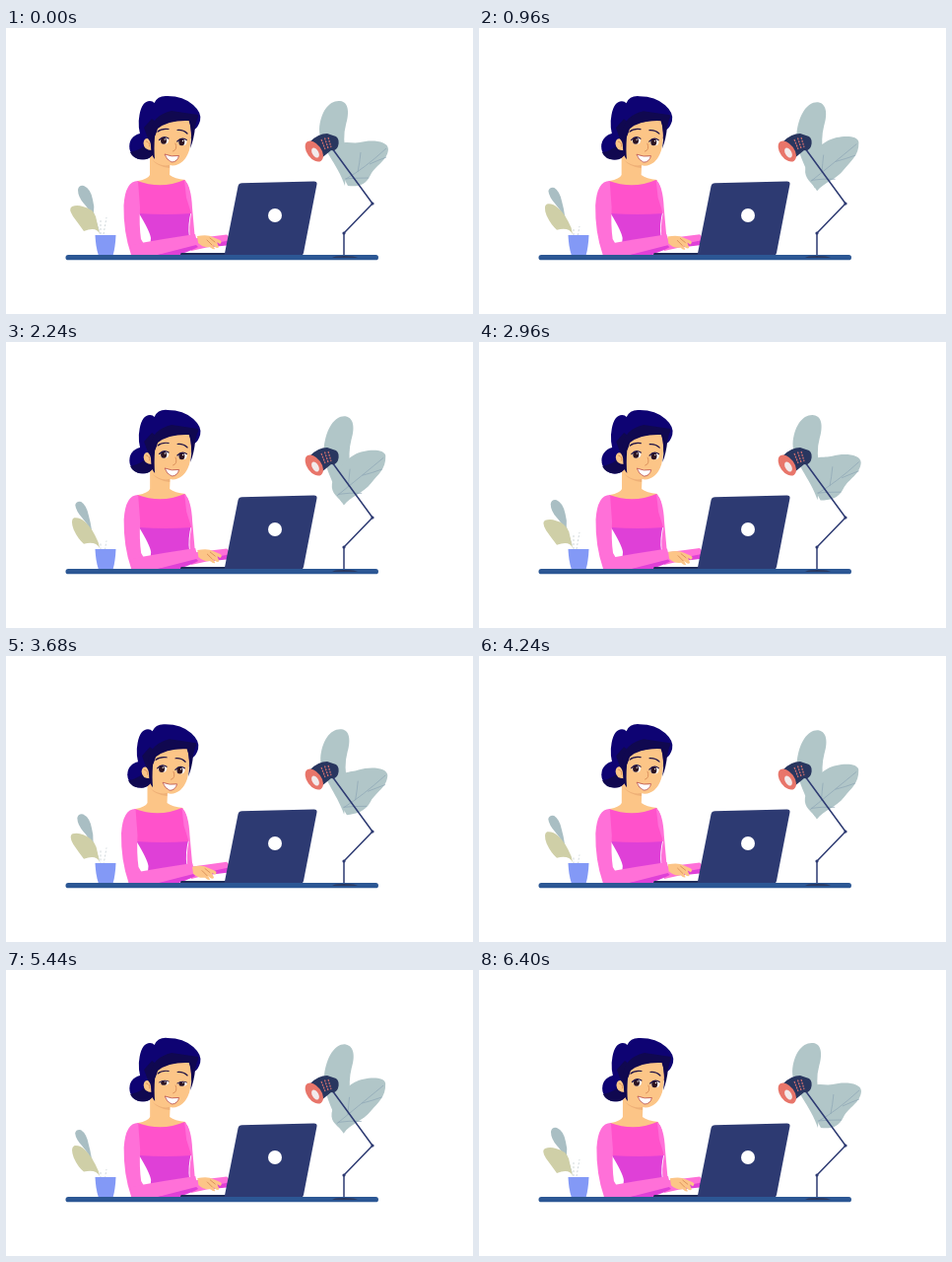
An HTML page that plays this animation: 474x290 px, repeating every 6480 ms.

```html
<!DOCTYPE html>
<html lang="en">
<head>
<meta charset="utf-8">
<title>Working at a desk</title>
<style>
  html, body { margin: 0; width: 100%; height: 100%; overflow: hidden; background: #fff; }
  svg { display: block; width: 474px; height: 290px; }
  .skin { fill: #fcc587; }
  .hair { fill: #0e0373; }
  .shade { fill: #100850; }
  .pink { fill: #ff52cb; }
  .sleeve { fill: #ff70d8; }
  .magenta { fill: #df40d7; }
  .navy { fill: #2d3a72; }
  .line { fill: none; stroke: #2d3a72; stroke-width: 1.5; stroke-linecap: round; stroke-linejoin: round; }
  .vein { fill: none; stroke: #8da5b5; stroke-width: .7; }
  .brow { fill: none; stroke: #1b1045; stroke-width: 1.2; stroke-linecap: round; }
  .crease { fill: none; stroke: #d88d59; stroke-width: .9; stroke-linecap: round; }
</style>
</head>
<body>
<svg viewBox="0 0 474 290">
  <g fill="#b1c6c8">
    <path id="tallLeaf"/>
    <path id="wideLeaf"/>
    <path id="veins" class="vein"/>
  </g>

  <g id="lamp">
    <path class="line" d="M331 122L372 178L343 208V231"/>
    <circle class="navy" cx="372" cy="178" r="1.6"/>
    <circle class="navy" cx="343" cy="208" r="1.6"/>
    <path fill="#29365f" d="M309 115Q317 107 326 107L335 110Q339 113 337 120Q335 125 330 124L319 133Z"/>
    <path d="M320 113l4 10M323.500 111.500l3.500 10.500M327 111l3 10" fill="none" stroke="#d87370" stroke-width="1.200" stroke-dasharray="2 1"/>
    <ellipse cx="312.800" cy="125" rx="12" ry="7.200" fill="#e8756a" transform="rotate(54 312.800 125)"/>
    <ellipse id="bulb" cx="314" cy="126.500" rx="5.500" ry="3.200" fill="#f2eaeb" transform="rotate(60 314 126.500)"/>
  </g>

  <path id="blueLeaf" fill="#a9bec3"/>
  <path id="oliveLeaf" fill="#cfcfa7"/>
  <path id="stems" d="M96 209L96 195M99 209L102 192" fill="none" stroke="#c5ced2" stroke-width=".8" stroke-dasharray="2 2"/>
  <path fill="#8399f6" d="M90.500 210H111.500Q111 222 108.500 231H94Q91 222 90.500 210Z"/>

  <g id="farArm">
    <path class="sleeve" d="M186 214L224 209Q229 213 225 219L205 222L188 226Z"/>
    <path class="magenta" d="M206 219L226 215L224 220L207 222Z"/>
  </g>
  <g id="body">
    <path class="skin" d="M146 126H167L166 149Q171 153 182 154L184 164H132L134 155Q144 153 146 149Z"/>
    <path fill="#eeb077" d="M148 133Q156 141 166 139L166 142Q154 141 148 133Z"/>
    <path class="magenta" d="M135 185H188Q184 200 186 212L178 230H140Q147 224 147 213Q146 206 135 188Z"/>
    <path class="pink" d="M133 155Q158 164 181 154Q187 160 187 174L188 188Q162 190 135 188Z"/>
    <path class="sleeve" d="M181 154Q188 160 189 182L191.500 210L187 214Q185 203 188 188L183 172Z"/>
    <path class="sleeve" d="M134 155Q121 155 119.500 180Q119 207 127 230H140Q144 224 137 214Q135 200 136 182Z"/>
  </g>
  <g id="nearArm">
    <path class="sleeve" d="M126 220Q142 217 160 214L192 209L195 221L172 227L148 231H128Z"/>
    <path class="magenta" d="M150 231L193 220L195 222Q186 227 171 231Z"/>
  </g>
  <g id="hand">
    <path class="skin" d="M193 211Q204 209 209 212L216 215Q219 217 216 219L213 217L215 222Q214 224 211 222L209 220L211 224Q209 225 206 222Q199 223 194 218Z"/>
    <path class="crease" d="M206 213l5 4M203 215l5 5"/>
  </g>

  <g id="head">
    <circle class="hair" cx="138.500" cy="120" r="13.300"/>
    <path class="shade" d="M126 126Q138 124 149 112L151 126Q146 134 138 133.300Q129 133 126 126Z"/>
    <path class="hair" d="M138 114Q133 100 135.500 88Q138 74 146 74Q149 74 150.500 76Q154 68 164 69Q180 69 190 78Q199 86 197 94Q195 101 191 103L188 112L172 112L146 122Z"/>
    <path class="skin" d="M150 100Q165 94 186 93Q190 109 186 124Q181 139 169 139.500Q153 137 148 124Q140 124 139.500 117Q140 110 147 113Z"/>
    <path class="crease" d="M142.500 115q4 1 3 5"/>
    <path class="shade" d="M148 92Q157 97 151 110Q150 123 151 133Q147 129 147 120Q147 115 144 112L140 101Z"/>
    <path class="shade" d="M146 106Q149 88 168 84L195 88Q196 95 186 94Q165 93 154 102L150 112Z"/>
    <path class="shade" d="M185 92Q190 105 187 122Q191 112 192 100L194 92Z"/>
    <path class="brow" d="M154 105Q158 101.500 165 102.500M174 103.500Q180 103 184 107"/>
    <g id="eyes">
      <g id="eye">
        <ellipse cx="160.800" cy="114" rx="4.300" ry="3.600" fill="#fff"/>
        <ellipse cx="160" cy="114.200" rx="3" ry="3.500" fill="#2d1422"/>
        <circle cx="161.200" cy="113" r=".7" fill="#fff"/>
        <path class="brow" d="M155.500 113.500Q160 108.500 165 112"/>
      </g>
      <use href="#eye" x="18.300" y="1.500"/>
    </g>
    <path class="crease" d="M172 117Q174.500 123.500 169.500 125"/>
    <path d="M161 128Q168 131 175.500 129.500Q174 136 168 136Q163 134 161 128Z" fill="#fff" stroke="#b94f4c" stroke-width=".8"/>
  </g>

  <path fill="#1f2c58" d="M178 228H224V231H178Q176 229.500 178 228Z"/>
  <path class="navy" d="M239.500 157.300L312.500 155.500Q316 155.500 315.500 158.500L302 228Q301.500 231 298 231H221.500L235.500 160.500Q236.300 157.300 239.500 157.300Z"/>
  <circle cx="273" cy="190" r="7" fill="#fff"/>
  <rect x="60.500" y="230" width="317.500" height="5.300" rx="2.650" fill="#2c5794"/>
  <path fill="#28375f" d="M331 233Q333 231 343 231Q354 231 357 233Z"/>
</svg>
<script>
  const LOOP = 6480, STEP = 80, SWAY = LOOP / 2, TAP = LOOP / 6;
  const el = id => document.getElementById(id);
  const wave = (t, peak, period) => Math.cos(2 * Math.PI * (t - peak) / period);
  const move = (id, value) => el(id).setAttribute('transform', value);

  // Each pair holds the open and the closed pose of a leaf.
  const leaves = {
    tallLeaf: ['M344 160C337 138 318 120 318 103C319 85 328 73 339 74C349 75 348 88 345 98Q341 112 346 130Z',
               'M339 164C331 146 322 126 325 108C328 88 337 75 347 76C357 78 356 91 353 100Q350 112 351 130Z'],
    wideLeaf: ['M347 160C341 149 335 134 337 122C341 112 350 118 359 116C370 113 388 114 388 123C387 135 375 139 370 149C365 160 357 161 347 160Z',
               'M341 168C336 160 327 164 328 154C330 138 342 120 352 113C360 107 383 104 384 112C385 126 379 132 371 140C361 151 346 154 341 168Z'],
    veins: ['M345 153Q363 143 386 122M357 146Q359 137 360 126M369 138Q378 134 386 131M344 153Q354 152 368 152',
            'M332 157Q353 138 382 115M343 147Q343 138 344 130M358 134Q369 132 380 128M334 155Q345 153 358 154'],
    blueLeaf: ['M73 164Q74 159 79 160Q86 163 88 174Q90 181 89 187L96 210Q87 186 79 178Q73 171 73 164Z',
               'M69 166Q70 162 75 163Q80 167 82 177Q84 184 86 192L95 210Q85 188 77 179Q70 172 69 166Z'],
    oliveLeaf: ['M95 209Q92 201 79 206Q74 199 68 191Q63 183 67 181Q72 179 78 181Q88 183 91 191Q94 198 95 209Z',
                'M95 209Q91 202 79 204Q73 201 69 190Q66 179 70 177Q77 177 81 183Q87 191 95 209Z']
  };

  function morph([from, to], k) {
    const goal = to.match(/[\d.]+/g);
    let i = 0;
    return from.replace(/[\d.]+/g, n => (+n + (goal[i++] - n) * k).toFixed(2));
  }

  function draw(now) {
    const t = Math.floor(now % LOOP / STEP) * STEP;
    const fold = (1 + wave(t, SWAY / 2, SWAY)) / 2;
    const tap = wave(t, 20, TAP);
    const lean = 0.4 * wave(t, 2650, SWAY) + 0.6 * tap - 0.76;

    for (const id in leaves) el(id).setAttribute('d', morph(leaves[id], fold));
    move('stems', `translate(0 ${14 * fold})`);

    move('body', `translate(${1.8 * lean} 0)`);
    move('head', `translate(${1.4 * lean} ${-0.2 * lean})`);
    move('nearArm', `translate(${2 * lean} ${0.5 - 0.5 * tap})`);
    move('hand', `translate(${3.6 * lean + 1} ${1.5 - 1.5 * tap})`);
    move('farArm', `rotate(${0.8 * tap} 190 216)`);

    const lid = Math.abs(t - 5440) <= STEP ? 0.65 : 1;
    move('eyes', `translate(0 ${115 * (1 - lid)}) scale(1 ${lid})`);
    el('bulb').setAttribute('opacity', Math.abs(t - 4860) < 240 ? 0 : 1);
    requestAnimationFrame(draw);
  }
  requestAnimationFrame(draw);
</script>
</body>
</html>
```
